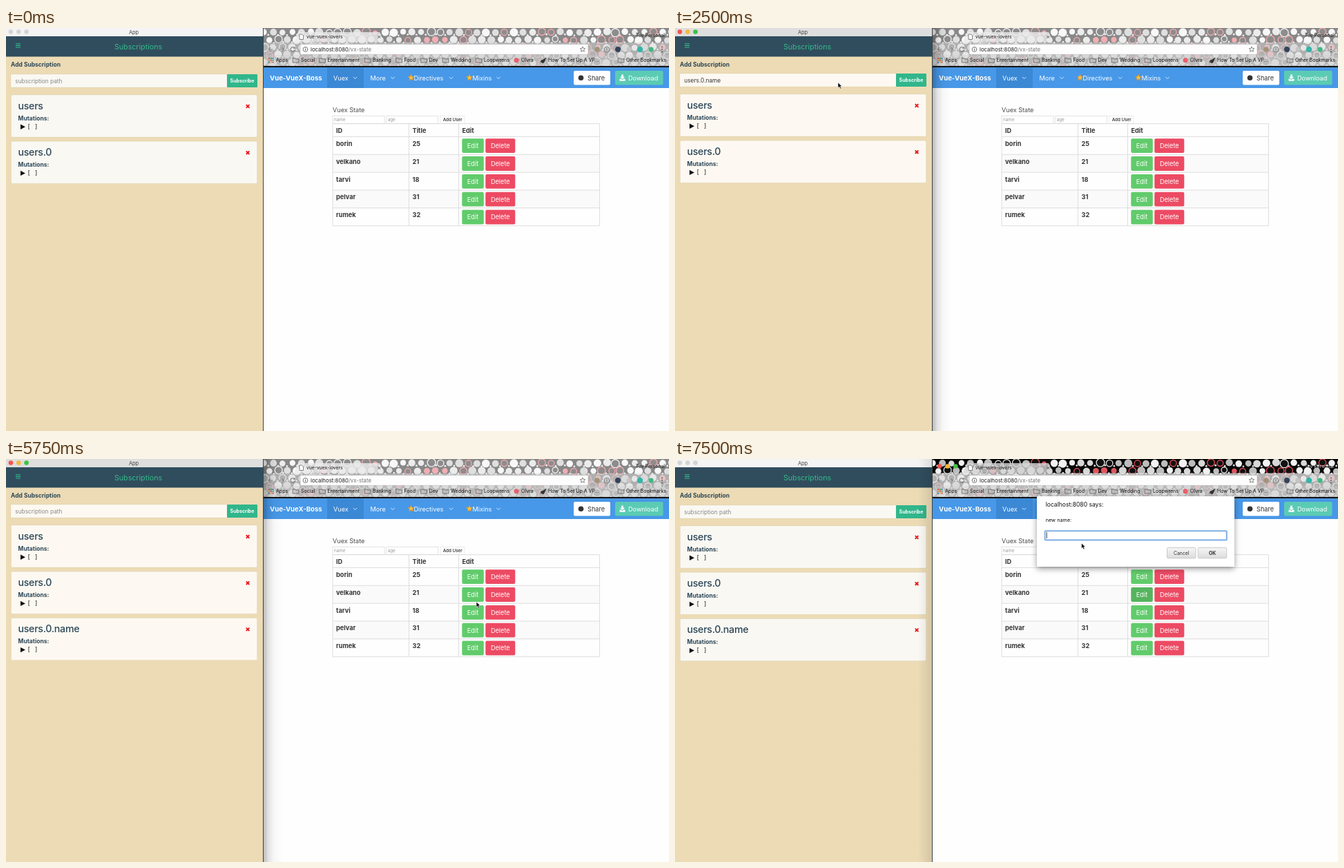
Write an HTML page that moves like this. It is 960 px wide and 584 px high and loops after 8 s.

```html
<!DOCTYPE html>
<html lang="en">
<head>
<meta charset="utf-8">
<title>Subscriptions</title>
<style>
  html, body { margin: 0; width: 100%; height: 100%; overflow: hidden; background: #fff; }
  svg { display: block; }
  #stage { width: 100%; height: 100%; }
  text { font-family: Inter, "Open Sans", sans-serif; white-space: pre; }
  .paper { fill: #faf8f3; stroke: #0a0a0a; stroke-opacity: .07; stroke-width: .6; }
  .focused .paper { fill: #fdf9f2; }
  .mono { font-family: "DejaVu Sans Mono", monospace; }
</style>
</head>
<body>
<svg id="stage" viewBox="0 0 960 584"></svg>
<script>
const LOOP = 8000, STEP = 250;
const stage = document.getElementById('stage');

// Markup helpers
const rect = (x, y, w, h, fill, extra = '') =>
  `<rect x="${x}" y="${y}" width="${w}" height="${h}" fill="${fill}" ${extra}/>`;
const text = (x, y, size, fill, str, extra = '') =>
  `<text x="${x}" y="${y}" font-size="${size}" fill="${fill}" ${extra}>${str}</text>`;
const circle = (x, y, r, fill, extra = '') =>
  `<circle cx="${x}" cy="${y}" r="${r}" fill="${fill}" ${extra}/>`;
const line = (d, stroke, width = 1) =>
  `<path d="${d}" fill="none" stroke="${stroke}" stroke-width="${width}"/>`;
const group = (id, body) => `<g id="${id}">${body}</g>`;
const BOLD = ' font-weight="700"', MEDIUM = ' font-weight="500"', MID = ' text-anchor="middle"';

const star = (cx, cy, r, fill, stroke) => {
  const points = Array.from({ length: 10 }, (_, i) => {
    const a = i * Math.PI / 5, q = i % 2 ? r * 0.45 : r;
    return `${(cx + q * Math.sin(a)).toFixed(2)},${(cy - q * Math.cos(a)).toFixed(2)}`;
  });
  return `<polygon points="${points.join(' ')}" fill="${fill}" stroke="${stroke}" stroke-width=".7"/>`;
};
const lights = (x, y, gap, colors) =>
  colors.map((c, i) => circle(x + i * gap, y, 3.3, c)).join('');
const GREY_LIGHTS = Array(3).fill('#d4d4d4');
const COLOR_LIGHTS = ['#f4554e', '#f5b83d', '#3fc244'];

// Left window
function card(title, i) {
  const y = 97 + i * 67.2;
  return group('card' + i,
    rect(7.5, y, 356, 61, '', 'class="paper" rx="1.5"') +
    text(17.5, y + 20.7, 14.2, '#2c4758', title, MEDIUM + ' letter-spacing="-.02em"') +
    text(17.5, y + 37, 8.5, '#2c4758', 'Mutations:', BOLD) +
    `<path d="M21 ${y + 42.5}l7 3.7-7 3.7z" fill="#111"/>` +
    text(30.5, y + 49, 8.8, '#222', '[ ]', 'class="mono"') +
    line(`M347.8 ${y + 14.2}l4.6 4.6m0-4.6l-4.6 4.6`, '#e8161c', 1.9));
}

const appWindow =
  rect(0, 0, 372, 584, '#ecdbb5') +
  group('appIdle', rect(0, 0, 372, 12, '#f4f4f4') + lights(7, 5.6, 11.3, GREY_LIGHTS)) +
  group('appActive', rect(0, 0, 372, 12, '#dedede') + lights(7, 5.6, 11.3, COLOR_LIGHTS)) +
  text(185, 8.6, 7.4, '#444', 'App', MID) +
  rect(0, 12, 372, 29.5, '#304d5d') +
  line('M14 22.8h7m-7 2.6h7m-7 2.6h7', '#35b98b', 1.1) +
  text(191.5, 30.6, 10.7, '#35b98b', 'Subscriptions', MID) +
  text(7, 55.6, 8.5, '#2c4758', 'Add Subscription', BOLD) +
  group('appBody',
    rect(7, 67, 313, 19, '', 'class="paper"') +
    text(13.3, 79.6, 8.3, '#888', 'subscription path', 'id="pathText"') +
    rect(13, 72, 0.8, 10, '#222', 'id="caret"') +
    rect(320, 67, 44, 19, '#31b68b', 'rx="1"') +
    text(342, 79.3, 7, '#fff', 'Subscribe', MID + BOLD) +
    ['users', 'users.0', 'users.0.name'].map(card).join(''));

// Browser theme: rows of seeded discs and rings, small dots in the gaps
function themePattern() {
  let seed = 11;
  const rnd = () => (seed = seed * 16807 % 2147483647) / 2147483647;
  let out = '';
  for (let row = 0; row < 5; row++) {
    for (let col = 0; col < 46; col++) {
      const x = col * 13.4 + row % 2 * 6.7 + rnd() * 2, y = row * 11 + 5 + rnd() * 2;
      const r = 4 + rnd() * 2, kind = rnd();
      out += kind < 0.62 ? circle(x, y, r, ['#bdbdbd', '#d8d8d8', '#f2f2f2'][Math.floor(rnd() * 3)])
        : kind < 0.7 ? circle(x, y, r * 0.8, '#e05560')
        : circle(x, y, r, '#111', `stroke="${kind < 0.84 ? '#dd4a55' : '#ddd'}" stroke-width="1.4"`);
      out += circle(x + 6.7, y + 4, 1.4, '#ddd');
    }
  }
  return `<svg x="373" y="0" width="587" height="55">${rect(0, 0, 587, 55, '#070707')}${out}</svg>`;
}

const folder = x =>
  `<path d="M${x} 50v-6.3h3.2l.9 1.2h4.6v5.1z" fill="#bbb" fill-opacity=".6" stroke="#555" stroke-width=".7"/>`;
const bookmark = ([x, label]) => text(x, 49.2, 7.05, '#161616', label);
const folders = [[427, 'Social'], [465.5, 'Entertainment'], [531, 'Banking'], [576.5, 'Food'],
  [612.5, 'Dev'], [644, 'Wedding'], [692, 'Loopwrens'], [898, 'Other Bookmarks']];
const GRID_COLORS = ['#d9534f', '#4f9d58', '#4a80d0', '#d9a53f'];

const bookmarks =
  Array.from({ length: 9 }, (_, i) =>
    rect(380 + i % 3 * 2.8, 43 + Math.floor(i / 3) * 2.8, 2, 2, GRID_COLORS[i % 4])).join('') +
  folders.map(([x]) => folder(x - 11.8)).join('') +
  folders.map(bookmark).join('') +
  circle(739, 46.8, 3.5, '#e8606a') +
  '<path d="M773.5 50.5l1.5-4 3-1 4.5-3-2 5-1.5 3-2.5.5-1-1.5z" fill="#333"/>' +
  [[391, 'Apps'], [746, 'Olvra'], [785, 'How To Set Up A VP...']].map(bookmark).join('');

const chrome =
  themePattern() +
  rect(373, 20.5, 587, 18.5, '#e4e4e4', 'opacity=".76"') +
  rect(373, 39, 587, 16, '#dadada', 'opacity=".84"') +
  '<path d="M417 20.5l5-13q.6-1.5 2-1.5h116q1.5 0 2 1.5l5 13z" fill="#d8d8d8" fill-opacity=".8"/>' +
  group('browserActive', lights(383, 10.5, 11.6, COLOR_LIGHTS)) +
  rect(373, 0, 587, 20.5, '#fff', 'opacity=".52" id="browserIdle"') +
  '<path d="M425 9h3.5l2 2v5.5h-5.5z" fill="#fff" stroke="#555" stroke-width=".7"/>' +
  text(435, 15.2, 6.8, '#222', 'vue-vuex-lovers') +
  line('M538.4 11.2l3.6 3.6m0-3.6l-3.6 3.6', '#555', 0.9) +
  text(954, 13.3, 6.95, '#333', 'Tev Personal', 'text-anchor="end" id="profile"') +
  line('M386.5 31h-6.5m3-3l-3 3 3 3M396 31h6.5m-3-3l3 3-3 3', '#888', 1.1) +
  line('M417.8 29a3.2 3.2 0 1 0 .5 2.8m-.2-4.5v2h-2', '#777', 1.1) +
  rect(426, 23.5, 417, 14.8, '#fdfdfd', 'rx="1.5" stroke="#b5b5b5" stroke-width=".6"') +
  circle(433.5, 31, 3.4, 'none', 'stroke="#555" stroke-width=".8"') +
  line('M433.5 30.3v2.6m0-4.2v.8', '#555', 0.9) +
  text(441, 33.8, 7.8, '#222', 'localhost:8080<tspan fill="#777">/vx-state</tspan>') +
  star(835, 31, 4, 'none', '#555') +
  circle(856, 31, 3.8, '#a3937b') +
  circle(870, 31, 3.8, '#ccc', 'stroke="#777" stroke-width=".9"') + line('M870 29v4', '#777') +
  circle(886, 31, 4, '#34435a') + circle(902, 31, 3.5, '#c4c4c4') +
  circle(918, 31, 4.2, '#35b5a8') + circle(934, 31, 3.6, '#41b883') +
  [27.5, 31, 34.5].map(y => circle(950, y, 0.9, '#555')).join('') +
  bookmarks;

// Page
const navItem = ([x, label, chevron, starX]) =>
  (starX ? star(starX, 72, 4.7, '#fac13c', '#d98e2b') : '') +
  text(x, 75.5, 9.15, '#fff', label) +
  line(`M${chevron - 2.7} 70.9l2.7 2.7 2.7-2.7`, '#d5e8fb');

const nav =
  rect(373, 54.7, 587, 2.8, '#101418') +
  rect(373, 57.3, 587, 29.7, '#4798e8') +
  rect(465, 57.3, 53, 29.7, '#3b88d5') +
  text(382, 75.5, 9.6, '#fff', 'Vue-VueX-Boss', BOLD) +
  [[474, 'Vuex', 505.5], [527.5, 'More', 560], [590.5, 'Directives', 644.5, 586.5],
    [675.5, 'Mixins', 713, 671]].map(navItem).join('') +
  rect(822, 62, 53, 20.5, '#fff', 'rx="2"') +
  circle(832.5, 72.2, 3.8, '#333') +
  text(842, 75.6, 9.2, '#333', 'Share') +
  rect(882, 62, 69.5, 20.5, '#5bcbb4', 'rx="2"') +
  '<path d="M891.2 67.5h2.6v3.2h2.2l-3.5 3.5-3.5-3.5h2.2zM888.5 73.5h2l2 1.8 2-1.8h2v3.3h-8z" fill="#fff"/>' +
  text(901, 75.6, 9.15, '#fff', 'Download');

const people = [['borin', 25], ['velkano', 21], ['tarvi', 18], ['pelvar', 31], ['rumek', 32]];
const ROW = 25.82, TOP = 157.5, RULE = '#dbdbdb';
const button = (x, y, w, fill, label, extra = '') =>
  rect(x, y, w, 20.8, fill, `rx="2" ${extra}`) +
  text(x + w / 2, y + 13.8, 9.2, '#fff', label, MID);
const personRow = ([name, age], i) => {
  const y = TOP + i * ROW;
  return (i % 2 ? rect(473, y, 386.5, ROW, '#fafafa') : '') +
    line(`M473 ${y}h386.5`, RULE, 0.9) +
    text(478, y + 13.5, 9.2, '#363636', name, BOLD) +
    text(588.5, y + 13.5, 9.2, '#363636', age, BOLD) +
    button(660.3, y + 2.8, 31.5, '#61cb6b', 'Edit', `id="edit${i}"`) +
    button(694.3, y + 2.8, 43, '#ed4a63', 'Delete');
};
const field = (x, label) =>
  rect(x, 127.3, 75, 11, '#fff', 'stroke="#ddd" stroke-width=".8"') +
  text(x + 2, 135, 6.3, '#999', label);

const page =
  rect(373, 87, 587, 497, '#fefefe') +
  text(473, 121.6, 9.1, '#4a4a4a', 'Vuex State') +
  field(473, 'name') + field(550.7, 'age') +
  rect(629, 127.3, 35, 11, '#fff', 'stroke="#e4e4e4" stroke-width=".7"') +
  text(646.7, 135.1, 6.3, '#222', 'Add User', MID + MEDIUM) +
  people.map(personRow).join('') +
  line(`M473 138.7h386.5v${TOP + 5 * ROW - 138.7}h-386.5zM583.5 138.7v147.9M655.5 138.7v147.9`, RULE, 0.9) +
  [[478, 'ID'], [588.5, 'Title'], [660.5, 'Edit']]
    .map(([x, label]) => text(x, 151.7, 9.2, '#363636', label, BOLD)).join('');

const dialogButton = (x, label, extra = '') =>
  rect(x, 128.5, 41.5, 15.3, 'url(#metal)', 'rx="1.5" stroke="#b8b8b8" stroke-width=".7"') +
  text(x + 20.75, 138.8, 6.9, '#333', label, MID + extra);
const dialog = group('dialog',
  rect(524, 54, 286, 102, '#fff', 'rx="1.5" filter="url(#soft)"') +
  text(536.7, 69.2, 8.55, '#111', 'localhost:8080 says:') +
  text(536.7, 90.8, 7.3, '#111', 'new name:') +
  rect(537, 105, 261, 12, '#fff', 'stroke="#c8c8c8" stroke-width=".8"') +
  rect(535.5, 104.2, 263.5, 13.3, 'none', 'rx="1" stroke="#7fb2e8" stroke-width="1.8" id="ring"') +
  rect(537.8, 106, 0.8, 9, '#222', 'id="promptCaret"') +
  dialogButton(712.5, 'Cancel') + dialogButton(757.3, 'OK', BOLD));

stage.innerHTML = `
  <defs>
    <linearGradient id="metal" x2="0" y2="1"><stop stop-color="#f6f6f6"/><stop offset="1" stop-color="#dcdcdc"/></linearGradient>
    <linearGradient id="leftward"><stop stop-opacity="0"/><stop offset="1" stop-opacity=".1"/></linearGradient>
    <linearGradient id="rightward"><stop stop-opacity=".26"/><stop offset=".25" stop-opacity=".11"/><stop offset=".55" stop-opacity=".03"/><stop offset="1" stop-opacity="0"/></linearGradient>
    <filter id="soft" x="-10%" y="-10%" width="120%" height="135%"><feDropShadow dx="0" dy="3" stdDeviation="4" flood-opacity=".4"/></filter>
  </defs>` +
  page + nav + chrome + appWindow +
  rect(352, 0, 20, 584, 'url(#leftward)', 'id="browserShadow"') +
  rect(373, 0, 27, 584, 'url(#rightward)', 'id="appShadow"') +
  rect(372, 0, 1, 584, '#3d4246') + dialog +
  '<path id="cursor" d="M0 0v7.8l1.8-1.7 1.3 3 1.5-.7-1.3-2.8h2.5z" fill="#000" stroke="#fff" stroke-width=".6"/>';

// Pointer path: time, x, y
const pointerPath = [
  [250, 719, 136], [500, 610, 122], [750, 345, 88], [1000, 240, 76.5], [1250, 223.5, 77],
  [2500, 236, 79], [3250, 236, 79], [3500, 262, 84], [4000, 450, 135], [4500, 587.5, 183],
  [4750, 598.5, 190.5], [5250, 655, 203], [5750, 681, 207], [6000, 680, 201],
  [6250, 672, 197.5], [6500, 670.5, 196.5], [6750, 665, 191], [7000, 638, 165],
  [7250, 600, 131], [7500, 588.5, 122], [LOOP, 588.5, 122]
];
function pointerAt(t) {
  const i = pointerPath.findIndex(p => p[0] > t);
  const [t0, x0, y0] = pointerPath[i - 1], [t1, x1, y1] = pointerPath[i];
  const k = (t - t0) / (t1 - t0);
  return [x0 + (x1 - x0) * k, y0 + (y1 - y0) * k];
}

const $ = id => document.getElementById(id);
const show = (id, on) => { $(id).style.display = on ? '' : 'none'; };
const within = (t, from, to) => t >= from && t < to;
const blink = t => t % 1000 < 500;

function draw(now) {
  const t = Math.floor(now % LOOP / STEP) * STEP;
  const appFocused = within(t, 1000, 6000), browserFocused = t >= 6000;
  const typed = within(t, 2000, 3000);

  stage.classList.toggle('focused', appFocused);
  show('appActive', appFocused);
  show('appIdle', !appFocused);
  show('appShadow', appFocused);
  $('appBody').setAttribute('transform', `translate(0 ${appFocused ? -1 : 0})`);
  show('browserActive', browserFocused);
  show('browserIdle', !browserFocused);
  show('browserShadow', browserFocused);
  $('profile').setAttribute('fill', browserFocused ? '#ddd' : '#222');

  const path = $('pathText');
  path.textContent = typed ? 'users.0.name' : 'subscription path';
  path.setAttribute('fill', typed ? '#333' : '#888');
  show('caret', appFocused && blink(t));
  $('caret').setAttribute('x', typed ? 13.5 + path.getComputedTextLength() : 13);
  show('card2', t >= 3000);

  $('edit1').setAttribute('fill', t >= 6250 ? '#55b45e' : '#61cb6b');
  const opening = t < 6750;
  show('dialog', t >= 6500);
  $('dialog').setAttribute('opacity', opening ? 0.94 : 1);
  $('dialog').setAttribute('transform', `translate(0 ${opening ? -1 : 0})`);
  show('ring', !opening);
  show('promptCaret', blink(t - 500));

  const pointerVisible = t >= 250 && !within(t, 1500, 2500);
  show('cursor', pointerVisible);
  if (pointerVisible) $('cursor').setAttribute('transform', `translate(${pointerAt(t)})`);
}

const start = performance.now();
(function tick() {
  draw(performance.now() - start);
  requestAnimationFrame(tick);
})();
</script>
</body>
</html>
```
